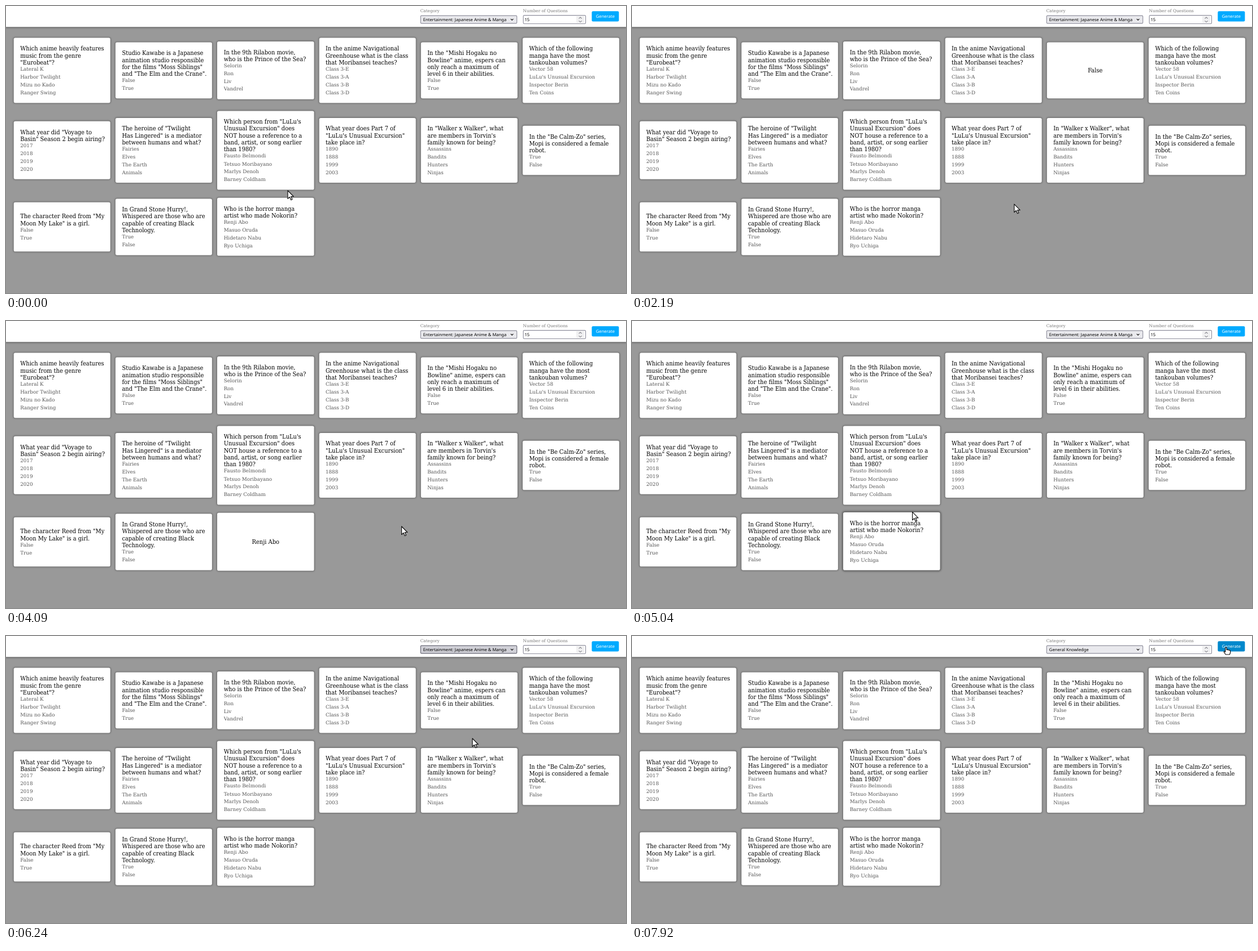
These frames come from a looping animation (1098 px wide and 510 px high, 8000 ms). An HTML page:

```html
<!DOCTYPE html>
<html lang="en">
<head>
<meta charset="utf-8">
<title>Flashcard quiz</title>
<style>
  html, body { margin: 0; width: 100%; height: 100%; overflow: hidden; background: #999; }
  #page {
    position: absolute; left: 0; top: 0; width: 1920px; height: 892px;
    transform: scale(.571875); transform-origin: 0 0;
    font: 15.36px/18px "DejaVu Serif", serif; text-rendering: geometricPrecision;
    white-space: nowrap;
  }
  header {
    position: absolute; left: 0; top: 0; width: 100%; height: 64.5px;
    background: #fff; box-shadow: 0 0 5px 3px rgba(0,0,0,.3);
  }
  header > * { position: absolute; box-sizing: border-box; }
  label { top: 8px; font-size: 12.8px; line-height: 15px; color: #777; }
  .field, #button { font: 13.333px/22px "Noto Sans", sans-serif; }
  .field { border: 2px solid #8f8f9d; border-radius: 4px; }
  .field svg { position: absolute; fill: none; stroke-width: 2; }
  #select { left: 1283px; top: 29px; width: 300px; height: 26px; padding-left: 7px; background: #e9e9ed; }
  #select.hover { background: #d0d0d7; border-color: #676774; }
  #number { left: 1601px; top: 28px; width: 195px; height: 28px; padding-left: 3px; line-height: 25px; background: #fff; }
  #number i { position: absolute; right: 3px; top: 1px; width: 25px; height: 22px; background: #f0f0f1; }
  #button {
    left: 1814px; top: 16.2px; width: 84px; height: 31.5px; border-radius: 4px;
    line-height: 31.5px; text-align: center; color: #fff; background: hsl(200,100%,50%);
  }
  #button.hover { background: hsl(200,100%,40%); }
  #grid {
    position: absolute; left: 24px; top: 99.2px; display: grid; align-items: center;
    grid-template-columns: repeat(6, 299.2px); gap: 25.6px 16px;
  }
  .card {
    position: relative; box-sizing: border-box; min-height: 153px; padding: 22.7px 20px;
    display: flex; flex-direction: column; justify-content: center;
    background: #fff; border-radius: 5px;
  }
  .question, .back {
    font: 19.2px/21.5px "DejaVu Serif Condensed", "DejaVu Serif", serif;
    font-stretch: condensed; font-size: var(--big, 19.2px); color: #000;
  }
  .question { margin-bottom: 1px; }
  .answer { color: #555; }
  .answer + .answer { margin-top: 6.2px; }
  .back { position: absolute; inset: 0; display: flex; align-items: center; justify-content: center; visibility: hidden; }
  .flipped > * { visibility: hidden; }
  .flipped > .back { visibility: visible; }
  #cursor { position: absolute; left: 0; top: 0; overflow: visible; }
  #cursor path { fill: #fff; stroke: #111; stroke-width: 1.2; stroke-linejoin: round; }
</style>
</head>
<body>
<div id="page">
  <div id="grid"></div>
  <header>
    <label style="left:1283px">Category</label>
    <div id="select" class="field"><span></span>
      <svg style="right:8px;top:7px" width="12" height="9" stroke="#111"><path d="M2 2l4 4 4-4"/></svg>
    </div>
    <label style="left:1601px">Number of Questions</label>
    <div id="number" class="field">15<i>
      <svg style="left:6px;top:1px" width="13" height="20" stroke="#85858c"><path d="M2 7l4.500-4 4.500 4M2 14l4.500 4 4.500-4"/></svg></i>
    </div>
    <div id="button">Generate</div>
  </header>
</div>
<svg id="cursor" width="14" height="20">
  <path id="arrow" d="M0 0V14.500L3.400 11.400 5.700 16.700 8 15.700 5.700 10.500H10.300Z"/>
  <path id="hand" d="M-1.200 .8Q0-.6 1.200.8V4.600Q2.500 3.800 3.600 4.900 5 4.400 5.800 5.500 7.600 5.200 7.600 7V10L6.300 13H-.6L-3.600 8.700Q-4 7-2.500 7.200L-1.200 8.300Z"/>
</svg>
<script>
const $ = id => document.getElementById(id);
const trueFalse = 'True|False', falseTrue = 'False|True';

// Question lines, then answers; the first answer of a flipped card is the correct one.
const cards = [
  ['Which anime heavily features|music from the genre|"Eurobeat"?', 'Lateral K|Harbor Twilight|Mizu no Kado|Ranger Swing'],
  ['Studio Kawabe is a Japanese|animation studio responsible|for the films "Moss Siblings"|and "The Elm and the Crane".', falseTrue],
  ['In the 9th Rilabon movie,|who is the Prince of the Sea?', 'Selorin|Ron|Liv|Vandrel'],
  ['In the anime Navigational|Greenhouse what is the class|that Moribansei teaches?', 'Class 3-E|Class 3-A|Class 3-B|Class 3-D'],
  ['In the "Mishi Hogaku no|Bowline" anime, espers can|only reach a maximum of|level 6 in their abilities.', falseTrue],
  ['Which of the following|manga have the most|tankouban volumes?', "Vector 58|LuLu's Unusual Excursion|Inspector Berin|Ten Coins"],
  ['What year did "Voyage to|Basin" Season 2 begin airing?', '2017|2018|2019|2020'],
  ['The heroine of "Twilight|Has Lingered" is a mediator|between humans and what?', 'Fairies|Elves|The Earth|Animals'],
  ['Which person from "LuLu\'s|Unusual Excursion" does|NOT house a reference to a|band, artist, or song earlier|than 1980?', 'Fausto Belmondi|Tetsuo Moribayano|Marlys Denoh|Barney Coldham'],
  ['What year does Part 7 of|"LuLu\'s Unusual Excursion"|take place in?', '1890|1888|1999|2003'],
  ['In "Walker x Walker", what|are members in Torvin\'s|family known for being?', 'Assassins|Bandits|Hunters|Ninjas'],
  ['In the "Be Calm-Zo" series,|Mopi is considered a female|robot.', trueFalse],
  ['The character Reed from "My|Moon My Lake" is a girl.', falseTrue],
  ['In Grand Stone Hurry!,|Whispered are those who are|capable of creating Black|Technology.', trueFalse],
  ['Who is the horror manga|artist who made Nokorin?', 'Renji Abo|Masuo Oruda|Hidetaro Nabu|Ryo Uchiga']
];

// Smaller regular face where the condensed one is missing.
const pen = document.createElement('canvas').getContext('2d');
const wide = font => (pen.font = font, pen.measureText('mnemonic').width);
if (wide('condensed 100px "DejaVu Serif Condensed", "DejaVu Serif", serif') > wide('100px "DejaVu Serif", serif') * .97)
  document.documentElement.style.setProperty('--big', '17.3px');

function add(parent, name, text = '') {
  const el = parent.appendChild(document.createElement('div'));
  el.className = name;
  el.textContent = text;
  return el;
}

const views = cards.map(([question, answers]) => {
  const el = add($('grid'), 'card'), list = answers.split('|');
  const q = add(el, 'question');
  question.split('|').forEach(line => add(q, '', line));
  list.forEach(a => add(el, 'answer', a));
  add(el, 'back', list[0]);
  return el;
});
const boxes = views.map(el => el.getBoundingClientRect());

// Pointer path: time, x, y
const path = [
  [0, 499, 328], [320, 499, 328], [500, 585, 385], [680, 690, 330], [1060, 837, 105],
  [1390, 837, 105], [1490, 845, 107], [1800, 845, 107], [2020, 722, 330], [2190, 678, 352],
  [2420, 428, 363], [2820, 428, 363], [2950, 545, 403], [3050, 573, 401], [3290, 721, 213],
  [3500, 840, 108], [3780, 840, 108], [3950, 728, 335], [4090, 701, 365], [4650, 470, 363],
  [5000, 470, 363], [5580, 846, 29], [5720, 846, 29], [6240, 826, 182], [6520, 826, 182],
  [6720, 812, 8], [6840, 812, 8], [7040, 797, 50], [7270, 797, 50], [7920, 1052, 20], [8000, 1052, 20]
];
const flips = { 4: [1590, 3520], 14: [2580, 4690] };
const FLIP = 150, LOOP = 8000;

const clamp = v => Math.min(1, Math.max(0, v));
const ease = v => v * v * (3 - 2 * v);

function pointer(t) {
  const i = Math.max(1, path.findIndex(p => p[0] >= t));
  const [t0, x0, y0] = path[i - 1], [t1, x1, y1] = path[i];
  const k = clamp((t - t0) / (t1 - t0));
  return [x0 + (x1 - x0) * k, y0 + (y1 - y0) * k];
}

const menuOpen = t => t > 5600 && t < 7280;

function over(box, t) {
  const [x, y] = pointer(Math.max(0, t));
  return !menuOpen(t) && x >= box.left && x <= box.right && y >= box.top && y <= box.bottom;
}

// Share of the last 150 ms the pointer spent on the box
function glow(box, t) {
  let n = 0;
  for (let k = 0; k < 6; k++) n += over(box, t - k * 25);
  return n / 6;
}

const buttonBox = $('button').getBoundingClientRect();
const label = $('select').firstChild;

function draw(t) {
  views.forEach((el, i) => {
    const h = glow(boxes[i], t);
    const [on, off] = flips[i] || [LOOP * 2, LOOP * 2];
    const turn = 180 * (ease(clamp((t - on) / FLIP)) - ease(clamp((t - off) / FLIP)));
    const back = turn > 90, angle = back ? turn - 180 : turn;
    el.classList.toggle('flipped', back);
    el.style.boxShadow = `0 0 5px ${2 + 3 * h}px rgba(0,0,0,.3)`;
    el.style.transform = angle ? `perspective(1000px) rotateY(${angle}deg) translateY(${-2 * h}px)`
      : h ? `translateY(${-2 * h}px)` : 'none';
  });

  const text = t < 7280 ? 'Entertainment: Japanese Anime & Manga' : 'General Knowledge';
  if (label.textContent !== text) label.textContent = text;
  $('select').classList.toggle('hover', t > 5560 && t < 7280);

  const onButton = over(buttonBox, t);
  $('button').classList.toggle('hover', onButton);

  const [x, y] = pointer(t);
  const hand = onButton || boxes.some(b => over(b, t));
  $('hand').style.display = hand ? '' : 'none';
  $('arrow').style.display = hand ? 'none' : '';
  $('cursor').style.transform = `translate(${x}px, ${y}px)`;
}

const start = performance.now();
function tick() {
  draw((performance.now() - start) % LOOP);
  requestAnimationFrame(tick);
}
tick();
</script>
</body>
</html>
```
